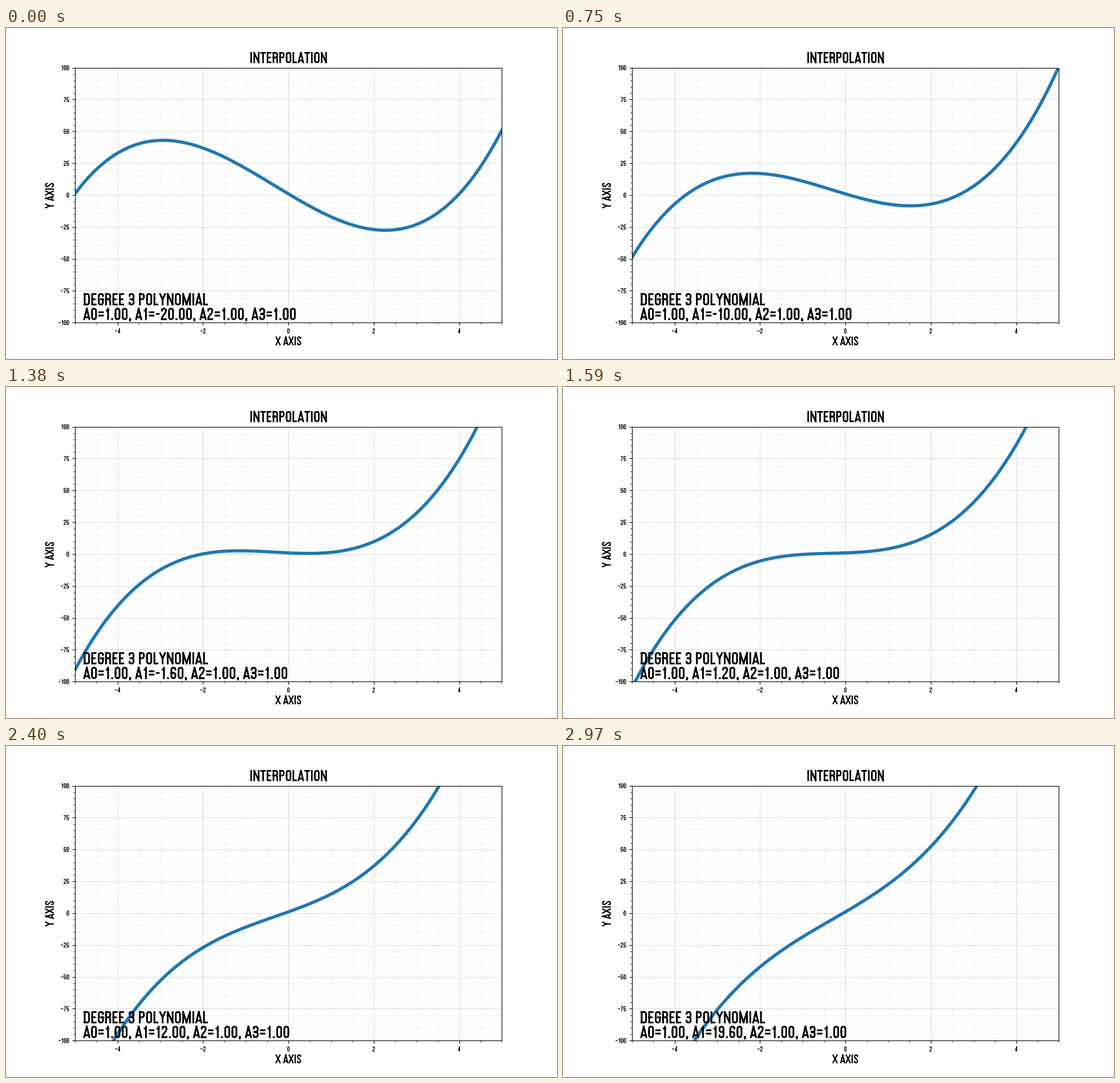
Animation of 966x580 px, one loop 3 s. Source, as a matplotlib script:

```python
import numpy as np
import matplotlib.pyplot as plt
from matplotlib.animation import FuncAnimation
from matplotlib.patches import PathPatch
from matplotlib.path import Path
from matplotlib.ticker import AutoMinorLocator
from matplotlib.transforms import Affine2D

W, H, DPI = 966, 580, 100
FRAMES, INTERVAL = 100, 30

# Condensed capitals drawn as strokes on a 5 x 5 grid, a..y from the top left;
# z lies below the baseline. A capital key sits halfway to the middle row.
# A stroke starting with "(" has round corners.
STROKES = {
    "A": "uc yc qs", "D": "au (aeyu", "E": "eauy kn", "G": "(jeauyo om",
    "I": "cw", "L": "auy", "M": "au aw we ey", "N": "au ay ey",
    "O": "(kaeyuk", "P": "au (aeok", "R": "au (aeok (koy",
    "S": "(jeaFTyup", "T": "ae cw", "X": "ay ue", "Y": "am em mw",
    "0": "(kaeyuk", "1": "dx gi", "2": "(faeJpu uy", "3": "(faeol (loyup",
    "4": "dpt dx", "5": "eak (koyup", "6": "(jeauyok", "7": "aev",
    "8": "(faeokf (pkoyup", "9": "(puyeako", ".": "vx", ",": "vx wz",
    "=": "FJ PT", "-": "ko", "\u2212": "ko", " ": "",
}
ADVANCE = {"A": .42, "D": .43, "E": .375, "G": .42, "I": .205, "L": .355,
           "M": .57, "N": .46, "O": .425, "R": .42, "T": .38, "X": .43,
           "1": .335, "=": .395, ".": .21, ",": .21, "-": .3, " ": .18}
ROWS = (1, .82, .5, .18, 0, -.13)
CAP, STEM, RADIUS = .7, .1, .12


def advance(char):
    return ADVANCE.get(char, .41)


def grid_point(key, char, x):
    row, col = divmod(ord(key.lower()) - ord("a"), 5)
    if key == "z":
        col = 2
    y = (ROWS[row] + .5) / 2 if key.isupper() else ROWS[row]
    side = (.012 if char in "ATXY" else .04) + STEM / 2
    return np.array([x + side + (advance(char) - 2 * side) * col / 4,
                     STEM / 2 + (CAP - STEM) * y])


def toward(p, q):
    return p + (q - p) * min(RADIUS / np.hypot(*(q - p)), .5)


def text_path(lines, align=0, pitch=.84):
    """Path in em units; align is 0 for left, .5 for centre, 1 for right."""
    verts, codes = [], []
    lines = lines.split("\n")
    for i, line in enumerate(lines):
        x = -align * sum(map(advance, line))
        lift = np.array([0, pitch * (len(lines) - 1 - i)])
        for char in line:
            for stroke in STROKES[char].split():
                pts = [grid_point(k, char, x) + lift for k in stroke.strip("(")]
                verts.append(pts[0])
                codes.append(Path.MOVETO)
                for a, p, b in zip(pts, pts[1:], pts[2:]):
                    if stroke[0] == "(":
                        verts += [toward(p, a), p, toward(p, b)]
                        codes += [Path.LINETO, Path.CURVE3, Path.CURVE3]
                    else:
                        verts.append(p)
                        codes.append(Path.LINETO)
                verts.append(pts[-1])
                codes.append(Path.LINETO)
            x += advance(char)
    return Path(verts, codes)


def write(text, x, y, size, align=0, angle=0):
    em = size * DPI / 72
    place = Affine2D().scale(em).rotate_deg(angle).translate(x, y)
    patch = PathPatch(text_path(text, align), fill=False, edgecolor="black",
                      lw=STEM * size, capstyle="projecting",
                      joinstyle="miter", transform=place)
    patch.set_snap(False)
    return fig.add_artist(patch)


def label(value):
    return str(value).replace("-", "\u2212")


def slope(i):
    return -20 + .4 * i


def caption_text(a1):
    return f"DEGREE 3 POLYNOMIAL\nA0=1.00, A1={a1:.2f}, A2=1.00, A3=1.00"


fig = plt.figure(figsize=(W / DPI, H / DPI), dpi=DPI, facecolor="white")
ax = fig.add_axes([.125, .11, .775, .77])
ax.set(xlim=(-5, 5), ylim=(-100, 100),
       xticks=range(-4, 5, 2), yticks=range(-100, 101, 25))
ax.xaxis.set_minor_locator(AutoMinorLocator(4))
ax.yaxis.set_minor_locator(AutoMinorLocator(5))
ax.tick_params(labelbottom=False, labelleft=False)
ax.set_axisbelow(True)
ax.grid(which="major", ls="--", lw=.5, color="#b0b0b0")
ax.grid(which="minor", ls="--", lw=.5, color="#b0b0b0", alpha=.3)

TICK = 9
for v in range(-4, 5, 2):
    px = ax.transData.transform((v, 0))[0]
    write(label(v), px, 44.8, TICK, .5)
for v in range(-100, 101, 25):
    py = ax.transData.transform((0, v))[1]
    write(label(v), 111, py - CAP * TICK * DPI / 144, TICK, 1)

write("INTERPOLATION", 495.3, 518.5, 20, .5)
write("X AXIS", 495.3, 24, 16, .5)
write("Y AXIS", 84, 286.5, 16, .5, 90)
caption = write(caption_text(slope(0)), 135.2, 68.3, 22)

x = np.linspace(-5, 5, 200)
curve, = ax.plot(x, 1 + slope(0) * x + x**2 + x**3, color="#1f77b4", lw=4)


def update(i):
    a1 = slope(i)
    curve.set_ydata(1 + a1 * x + x**2 + x**3)
    caption.set_path(text_path(caption_text(a1)))
    return curve, caption


anim = FuncAnimation(fig, update, frames=FRAMES, interval=INTERVAL,
                     repeat=True, repeat_delay=0, blit=False)
plt.show()
```
